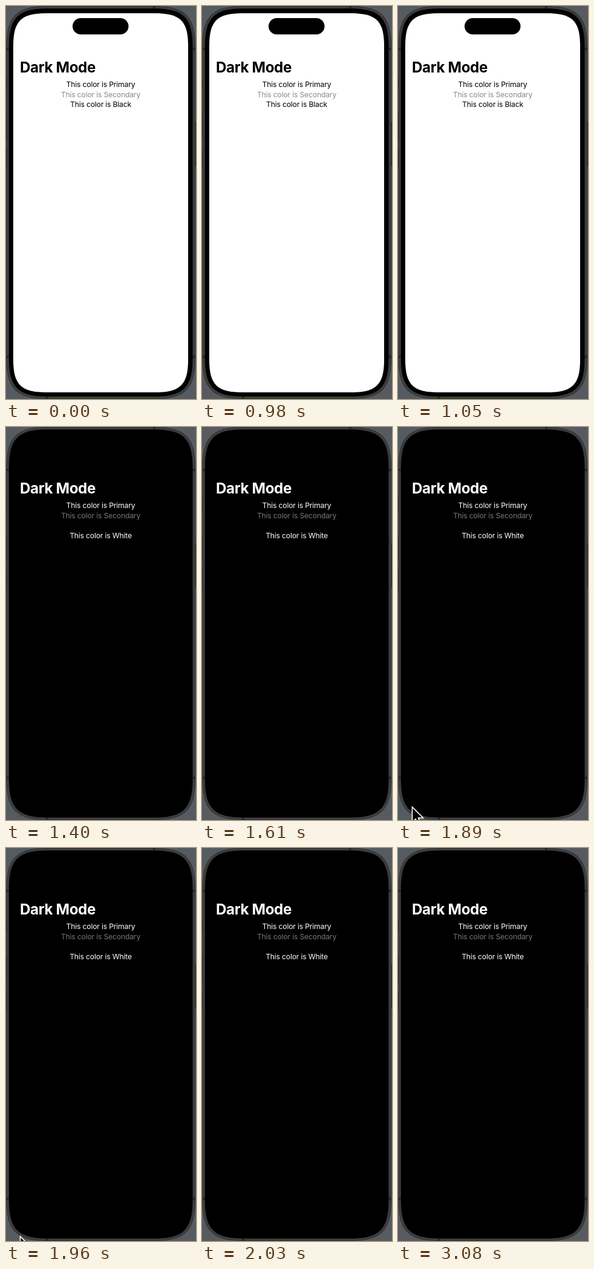
An HTML page for the animation above (3220 ms loop, 314 by 650 pixels).

```html
<!DOCTYPE html>
<html lang="en">
<head>
<meta charset="utf-8">
<title>Dark Mode</title>
<style>
  html, body { margin: 0; width: 100%; height: 100%; overflow: hidden; background: #565b62; }
  svg { display: block; --primary: #000; --secondary: #8a8a8a; --page: #fff; }
  svg.dark { --primary: #fff; --secondary: #777; --page: #000; }
  text { font: 12.15px Inter, "Liberation Sans", sans-serif; letter-spacing: -.17px; text-anchor: middle; font-optical-sizing: none; }
  .title { font-size: 24.2px; font-weight: 700; letter-spacing: -.4px; text-anchor: start; }
  .primary { fill: var(--primary); }
  .secondary { fill: var(--secondary); }
  #screen { fill: var(--page); }
</style>
</head>
<body>
<svg id="stage" width="314" height="650" viewBox="0 0 314 650">
  <path d="M0 117h1v22H0zM0 178h1v44H0zM0 235h1v35H0zM313 192h1v73h-1z" fill="#303133"/>
  <path id="edge" fill="#2b2c2c"/>
  <path id="band" fill="#414242"/>
  <path id="rim" fill="#343535"/>
  <path d="M1 69h4v4H1zM308 69h5v4h-5zM1 578h4v4H1zM308 578h5v4h-5zM243 1h4v3h-4zM66 646h4v3h-4z" fill="#252626"/>
  <path id="bezel"/>
  <path id="screen"/>
  <rect x="110" y="20" width="92.5" height="27" rx="13.5"/>
  <text class="title primary" x="23" y="110.2">Dark Mode</text>
  <text class="primary" x="156.5" y="134">This color is Primary</text>
  <text class="secondary" x="156.5" y="150.5">This color is Secondary</text>
  <text x="156.5" y="167">This color is Black</text>
  <text x="156.5" y="183.5" fill="#fff">This color is White</text>
  <path id="cursor" d="M0 0V25L5.6 19.8 9.6 29 14 27 10 18H18Z" stroke="#fff" stroke-width="1.6"/>
</svg>
<script>
const LOOP = 3220, DARK_AT = 1400, CURSOR_AT = 1890, CURSOR_END = 2030, STEP = 70;
const get = id => document.getElementById(id);

// Rectangle with smooth, continuous-curvature corners of extent e.
function smoothRect(id, l, t, r, b, e) {
  const k = e * .24;
  get(id).setAttribute('d',
    `M${l + e} ${t}H${r - e}C${r - k} ${t} ${r} ${t + k} ${r} ${t + e}` +
    `V${b - e}C${r} ${b - k} ${r - k} ${b} ${r - e} ${b}` +
    `H${l + e}C${l + k} ${b} ${l} ${b - k} ${l} ${b - e}` +
    `V${t + e}C${l} ${t + k} ${l + k} ${t} ${l + e} ${t}Z`);
}

smoothRect('edge', .5, 0, 313, 650, 69);
smoothRect('band', 1.5, 1, 312, 649, 68);
smoothRect('rim', 3.5, 3, 310, 647, 65);
smoothRect('bezel', 5, 4.3, 308.3, 645.7, 63);
smoothRect('screen', 12, 12, 301, 639, 54);

function draw(now) {
  const t = now % LOOP;
  get('stage').classList.toggle('dark', t >= DARK_AT);
  const shown = t >= CURSOR_AT && t < CURSOR_END;
  const drop = shown ? 14 * Math.floor((t - CURSOR_AT) / STEP) : 0;
  get('cursor').style.display = shown ? '' : 'none';
  get('cursor').setAttribute('transform', `translate(23.5 ${628.5 + drop})`);
  requestAnimationFrame(() => draw(performance.now() - start));
}
const start = performance.now();
draw(0);
</script>
</body>
</html>
```
